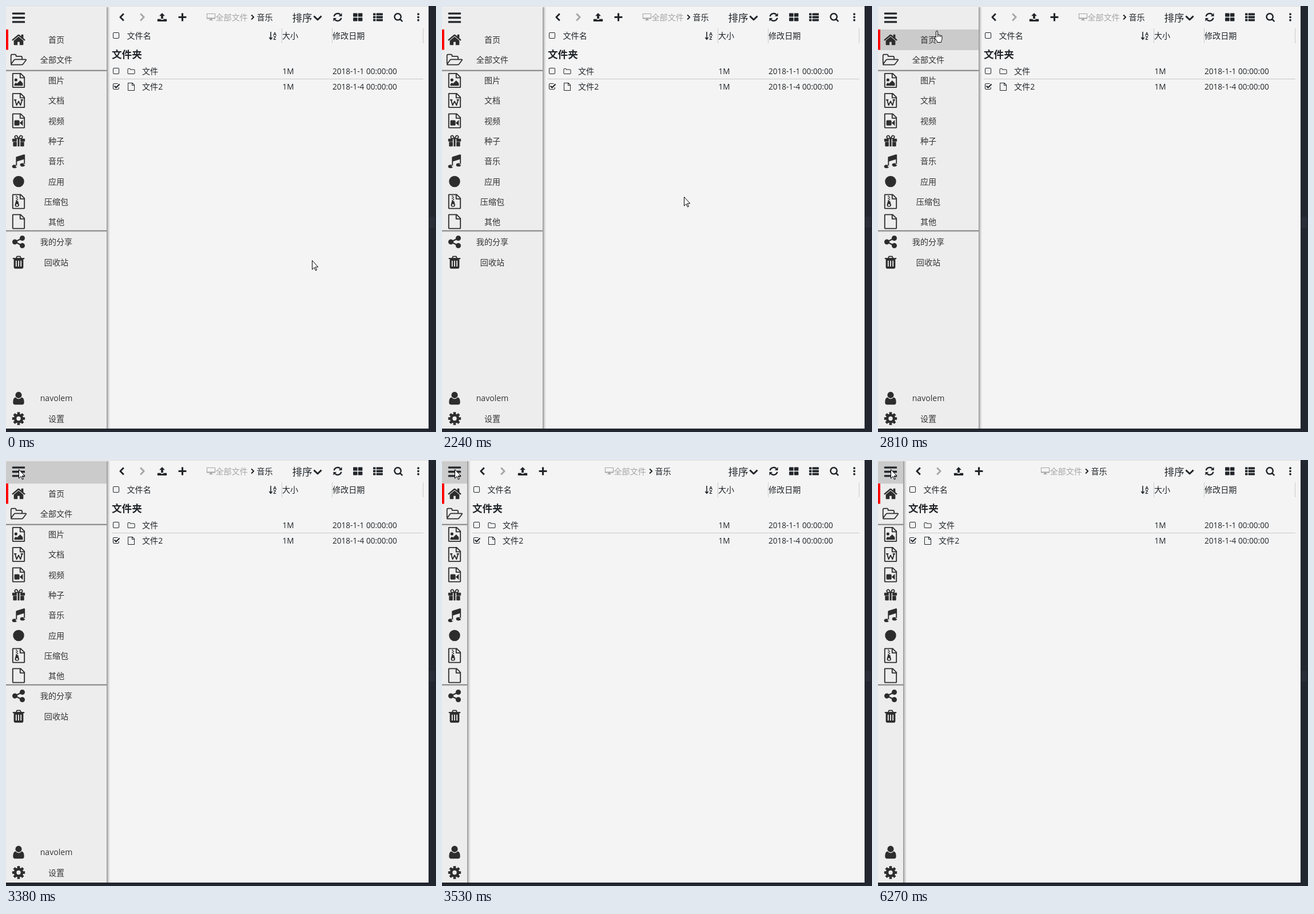
Animation, 752 px wide and 744 px high, one loop 8 s. Source, as an HTML page:

```html
<!DOCTYPE html>
<html lang="zh-CN">
<head>
<meta charset="utf-8">
<title>文件管理</title>
<style>
  html, body { margin: 0; width: 100%; height: 100%; overflow: hidden; background: #21262f; }
  svg { display: block; }
  text { font: 14.1px "Open Sans", "Noto Sans CJK SC", "Noto Sans CJK", sans-serif; fill: #212529; white-space: pre; }
  .latin { font-size: 13.6px; }
  .big { font-size: 17.6px; }
  .bold { font-weight: 700; }
  .tiny { font-size: 8.5px; font-weight: 700; }
  .mid { text-anchor: middle; fill: #333; }
  .grey { fill: #a6a6a6; }
</style>
</head>
<body>
<svg id="stage" width="752" height="744" viewBox="0 0 752 744"></svg>
<script>
const INK = '#212529', SOFT = '#2d2d2d', GREY = '#a6a6a6';
const LOOP = 8000;

// Path helpers; icons live on a 28 unit grid
const ring = (x, y, r) => `M${x - r} ${y}a${r} ${r} 0 1 0 ${2 * r} 0a${r} ${r} 0 1 0 ${-2 * r} 0z`;
const box = (x, y, w, h) => `M${x} ${y}h${w}v${h}h${-w}z`;
const hole = (x, y, w, h) => `M${x} ${y}v${h}h${w}v${-h}z`;
const softBox = (x, y, w, h, r) =>
  `M${x + r} ${y}h${w - 2 * r}q${r} 0 ${r} ${r}v${h - 2 * r}q0 ${r} ${-r} ${r}h${2 * r - w}q${-r} 0 ${-r} ${-r}v${2 * r - h}q0 ${-r} ${r} ${-r}z`;
const many = (list, fn) => list.map(fn).join('');

const SHEET = 'M3.5 1H18L25 8V26.5q0 .5-.5.5h-21q-.5 0-.5-.5v-25q0-.5.5-.5zM17 1v8h8';
const spokes = many([0, 1, 2, 3, 4, 5, 6, 7], i => {
  const c = Math.cos(i * Math.PI / 4), s = Math.sin(i * Math.PI / 4);
  return `M${14 + 7 * c} ${14 + 7 * s}L${14 + 12 * c} ${14 + 12 * s}`;
});

// name: [filled path, stroked path, stroke width]
const ICONS = {
  bars: [many([4.2, 12.2, 20.2], y => softBox(2, y, 24, 3.6, 1)), '', 0],
  home: ['M23 15.5v7.5q0 1-1 1h-6v-6h-4v6H6q-1 0-1-1v-7.5l9-7.4z' +
    'M26.4 14.5l-1 1.1q-.3.3-.7.1L14 6.7 3.3 15.7q-.4.2-.7-.1l-1-1.1q-.3-.4.1-.7L12.8 4.4q1.2-.8 2.4 0L19 7.6V4.5q0-.5.5-.5h3q.5 0 .5.5v6.4l3.3 2.9q.4.3.1.7z', '', 0],
  open: ['', 'M-.3 21V6.3q0-2.3 2.3-2.3h5q2.3 0 2.3 2.3v1h9q2.3 0 2.3 2.3v3.6' +
    'M7.5 13.2H27q2 0 .9 1.6l-5.4 7.1q-1.3 1.5-3 1.5H1.2q-2.2 0-.8-1.8l4.8-6.7q1-1.6 2.3-1.7z', 1.9],
  file: ['', SHEET, 2],
  image: ['M22 19v5H6v-3l3-3 2 2 6-6z' + ring(9, 13, 2.8), SHEET, 2],
  word: ['', SHEET + 'M7.4 13l2.9 10L14 15.500l3.700 7.500L20.600 13M5.500 12.900h4.500M18 12.900h4.500', 2],
  video: [softBox(6, 13, 9.8, 10, 1.8) + 'M22 12.5v11l-6-5.5z', SHEET, 2],
  gift: [many([2, 17.4], x => softBox(x, 10, 8.6, 5.4, .6)) + many([3.6, 17.4], x => softBox(x, 16, 7, 8.5, .8)) +
    box(12.3, 10, 3.4, 14.5), 'M13.5 9.5H9.2a2.7 2.7 0 1 1 2.2-4.6zM14.5 9.5h4.3a2.7 2.7 0 1 0-2.2-4.6z', 2],
  music: ['M9 7q0-1 1-1.3l14-4.3q2-.5 2 1.2V21h-2V10.5L11 14.6V25H9z' +
    'M1.8 24a4.6 3.2 0 1 0 9.2 0a4.6 3.2 0 1 0-9.2 0zM16.8 21a4.6 3.2 0 1 0 9.2 0a4.6 3.2 0 1 0-9.2 0z', '', 0],
  dot: [ring(14, 14, 10.5), '', 0],
  zip: [many([3, 5, 7, 9, 11], (y, i) => box(i % 2 ? 11 : 9, y, 2, 2)) +
    'M9 13h4l2 7q.3 4-4 4t-4-4z' + ring(11, 20.6, 1.9), SHEET, 2],
  share: [ring(7, 14, 4.9) + ring(21, 7, 4.9) + ring(21, 21, 4.9), 'M21 7L7 14l14 7', 2.6],
  trash: ['M5 8h18v15.500q0 2.500-2.500 2.500h-13Q5 26 5 23.500z' + many([8.5, 13, 17.5], x => hole(x, 11, 2, 11)),
    'M3 7h22M9.500 6.500l1.500-3.400h6l1.500 3.400', 2],
  user: [ring(14, 8, 6) + 'M8.3 12.5q2.5 2.9 5.7 2.9t5.7-2.9q4.8.7 4.8 9 0 4.5-4 4.5H7.5q-4 0-4-4.5 0-8.3 4.8-9z', '', 0],
  gear: ['', ring(14, 14, 6.5) + spokes, 5],
  left: ['', 'M18.5 4.5L9 14l9.5 9.5', 4.6],
  right: ['', 'M9.5 4.5L19 14l-9.5 9.5', 4.6],
  down: ['', 'M3.5 9.5L14 19.5l10.5-10', 4.6],
  upload: ['M14 2.5l8 8h-5v8h-6v-8H6zM2 19h7.5q1 2.5 4.5 2.5t4.5-2.5H26q1 0 1 1v5q0 1-1 1H2q-1 0-1-1v-5q0-1 1-1z', '', 0],
  plus: ['M11.5 3h5v8.5H25v5h-8.5V25h-5v-8.5H3v-5h8.5z', '', 0],
  desktop: ['M11 20h6l1 5h3v1.5H7V25h3z' + box(0, 17, 28, 3), 'M0 3h28v17H0z', 2.2],
  refresh: ['M26 2.5v9h-9zM2 25.5v-9h9z', 'M3.8 12A10.4 10.4 0 0 1 21.5 7M24.2 16A10.4 10.4 0 0 1 6.5 21', 3.7],
  grid: [many([1, 15], x => many([3, 15], y => softBox(x, y, 12, 10, 1.2))), '', 0],
  list: [many([3, 11, 19], y => softBox(.5, y, 7, 6, 1) + softBox(9.5, y, 18, 6, 1)), '', 0],
  search: ['', ring(13, 13, 9) + 'M19.5 19.5l6.500 6.500', 4],
  more: [many([3, 11.3, 19.6], y => softBox(11.3, y, 5.4, 5.4, 1.5)), '', 0],
  square: ['', softBox(4, 4, 20, 20, 3.5), 2],
  checked: ['M6.500 13.500l3-3 4.500 4.500L24.500 4.500l3 3L14 21z',
    'M23.5 17v3.5q0 3.5-3.5 3.5H7.5Q4 24 4 20.5v-13Q4 4 7.5 4H20', 2.2],
  folder: ['', 'M2 20.5v-13Q2 5 4.5 5h4Q11 5 11 7.5V8h12.5Q26 8 26 10.5v10q0 2.5-2.5 2.5h-19Q2 23 2 20.5z', 2]
};

function icon(name, cx, cy, em, color = INK) {
  const [fill, line, width] = ICONS[name];
  const k = em / 28;
  return `<g transform="translate(${cx - 14 * k} ${cy - 14 * k}) scale(${k})">` +
    (fill && `<path d="${fill}" fill="${color}"/>`) +
    (line && `<path d="${line}" fill="none" stroke="${color}" stroke-width="${width}" stroke-linejoin="round"/>`) + '</g>';
}
const rect = (x, y, w, h, fill, id = '') => `<rect id="${id}" x="${x}" y="${y}" width="${w}" height="${h}" fill="${fill}"/>`;
// Places text by its vertical centre
const label = (str, x, cy, cls = '', size = 14.1) => `<text x="${x}" y="${cy + size * .37}" class="${cls}">${str}</text>`;
const group = (id, body) => `<g id="${id}">${body}</g>`;

const MENU = [
  ['home', '首页', 59], ['open', '全部文件', 94], ['image', '图片', 130], ['word', '文档', 165],
  ['video', '视频', 200.5], ['gift', '种子', 235.5], ['music', '音乐', 271], ['dot', '应用', 306.5],
  ['zip', '压缩包', 341.5], ['file', '其他', 376.5], ['share', '我的分享', 412], ['trash', '回收站', 447.5],
  ['user', 'navolem', 685], ['gear', '设置', 720.5]
];
const ROWS = [
  ['square', 'folder', '文件', '2018-1-1 00:00:00', 114],
  ['checked', 'file', '文件2', '2018-1-4 00:00:00', 141]
];
const divider = (id, y) => group(id, rect(0, y - 1, 176, 1, '#cfcfcf') + rect(0, y, 176, 1, '#757575') +
  rect(0, y + 1, 176, 1, '#b5b5b5') + rect(0, y + 2, 176, 1, '#dedede'));

const ARROW = 'M.5 .5v15.6l3.6-3.4 2.4 5.3 2-.9-2.4-5.2h4.8z';
const HAND = 'M5 .5q1.5 0 1.5 1.5v5q2-.6 2.6.8 2-.5 2.5.9 2.4-.6 2.4 1.6v4q0 2-1.5 4v2.2H5.5v-2L1.2 13q-1-1.7 0-2.3 1-.5 2 .8l.3.6V2q0-1.5 1.5-1.5zM6.5 7v4M9.1 8v3M11.6 9v2';
const pointer = (id, d) => `<path id="${id}" d="${d}" fill="#fff" stroke="#000"/>`;

document.getElementById('stage').innerHTML =
  `<defs><linearGradient id="fade"><stop offset="0" stop-color="#000" stop-opacity=".42"/>
   <stop offset=".45" stop-color="#000" stop-opacity=".16"/><stop offset="1" stop-color="#000" stop-opacity="0"/></linearGradient></defs>` +
  rect(0, 0, 752, 744, '#21262f') + rect(740, 368, 10, 19, '#282d37') +
  rect(0, 0, 739, 738, '#f4f4f4') +
  // file area
  group('tools', icon('left', 203, 19.5, 17.6) + icon('right', 238, 19.5, 17.6, GREY) +
    icon('upload', 273, 19.5, 17.6) + icon('plus', 308.5, 19.5, 17.6) +
    icon('square', 192.5, 51.5, 14.1) + label('文件名', 211.5, 52) +
    label('文件夹', 185, 84, 'big bold', 17.6) +
    many(ROWS, ([mark, kind, name, , y]) =>
      icon(mark, 192.5, y - .5, 14.1) + icon(kind, 219, y, 14.1) + label(name, 238, y))) +
  group('crumb', icon('desktop', 358.5, 19, 14.1, GREY) + label('全部文件', 366.5, 19.5, 'grey') +
    icon('right', 431, 19.5, 12) + label('音乐', 438.5, 19.5)) +
  label('排序', 500.5, 20, 'big', 17.6) + icon('down', 545, 20.5, 17.6) +
  many(['refresh', 'grid', 'list', 'search', 'more'], (name, i) => icon(name, 580 + 35.25 * i, 19.5, 17.6)) +
  `<path d="M463 45v12M460.3 55l2.7 3.3 2.7-3.3" fill="none" stroke="${INK}" stroke-width="1.6"/>` +
  label('A', 467.3, 48.5, 'tiny', 8.5) + label('Z', 467.6, 56, 'tiny', 8.5) +
  many([482, 570, 729], x => rect(x, 39, 1, 26, '#cbcbcb')) +
  label('大小', 483, 52) + label('修改日期', 571, 52) +
  many(ROWS, ([, , , date, y]) => label('1M', 483.5, y, 'latin', 13.6) + label(date, 571, y, 'latin', 13.6)) +
  rect(185, 127, 545, 1, '#c9c9c9', 'rule') +
  // side bar
  group('edge', rect(176, 2, 6, 736, 'url(#fade)')) +
  rect(0, 2, 176, 736, '#ededed', 'side') +
  rect(0, 2, 176, 39.3, '#cbcbcb', 'topHover') + rect(0, 41, 176, 36, '#cbcbcb', 'homeHover') +
  rect(0, 41, 4, 35.5, '#f00') +
  divider('rule1', 112) + divider('rule2', 392) +
  icon('bars', 22, 20.5, 26) + many(MENU, ([name, , y]) => icon(name, 22, y, 26, SOFT)) +
  group('labels', many(MENU, ([, str, y]) => label(str, 88, y, 'mid'))) +
  rect(0, 0, 739, 1, '#dcdddf') +
  pointer('arrow', ARROW) + pointer('hand', HAND);

const $ = id => document.getElementById(id);
const shift = (id, x, y = 0) => $(id).setAttribute('transform', `translate(${x} ${y})`);
const show = (id, on) => $(id).setAttribute('visibility', on ? 'visible' : 'hidden');

// Pointer steps: time, x, y
const PATH = [
  [0, 535, 444], [1460, 535, 443], [1580, 507, 413], [1700, 476, 380], [1850, 472, 377], [1970, 477, 395],
  [2120, 466, 380], [2240, 423, 333], [2360, 346, 266], [2510, 255, 179], [2660, 187, 126],
  [2810, 98, 43], [2960, 60, 22], [3080, 40, 15], [3230, 23, 15], [3380, 22, 16]
];

function draw(now) {
  const t = now % LOOP;
  const [at, x, y] = PATH.findLast(step => step[0] <= t);
  const wide = t < 3530 || (t >= 5180 && t < 6270);
  const onHome = at === 2810;
  const width = wide ? 176 : 44;

  shift('tools', width - 176);
  shift('edge', width - 176);
  shift('crumb', (width - 176) / 2);
  $('rule').setAttribute('x', width + 9);
  $('rule').setAttribute('width', 721 - width);
  ['side', 'topHover', 'homeHover'].forEach(id => $(id).setAttribute('width', width));
  ['rule1', 'rule2'].forEach(id => [...$(id).children].forEach(r => r.setAttribute('width', width)));

  show('labels', wide);
  show('homeHover', onHome);
  show('topHover', t >= 2960);
  show('hand', onHome);
  show('arrow', !onHome);
  shift(onHome ? 'hand' : 'arrow', x, y);
}

const start = performance.now();
function tick() {
  draw(performance.now() - start);
  requestAnimationFrame(tick);
}
tick();
</script>
</body>
</html>
```
